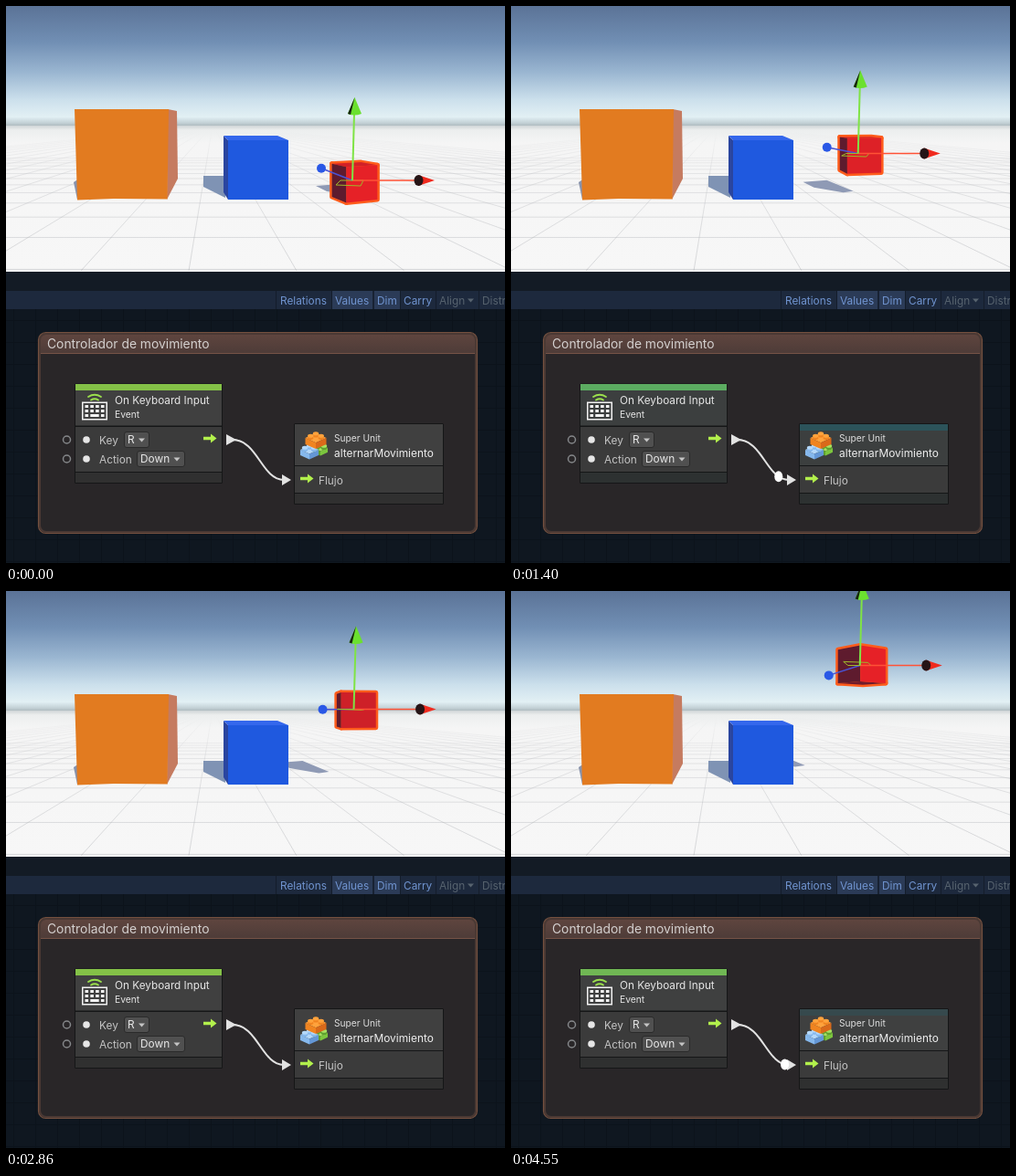
These frames come from a looping animation (546x610 px, 4.63 s). An HTML page:

```html
<!DOCTYPE html>
<html lang="es">
<head>
<meta charset="utf-8">
<style>
  html, body { margin: 0; width: 100%; height: 100%; overflow: hidden; background: #0f1720; }
  svg { display: block; width: 546px; height: 610px; font-family: Inter, Roboto, sans-serif; }
</style>
</head>
<body>
<svg viewBox="0 0 546 610" xmlns="http://www.w3.org/2000/svg">
  <defs>
    <linearGradient id="sky" x1="0" y1="0" x2="0" y2="1">
      <stop offset="0" stop-color="#5b7397"/>
      <stop offset=".3" stop-color="#718fb4"/>
      <stop offset=".55" stop-color="#9ab6d1"/>
      <stop offset=".78" stop-color="#cce0ec"/>
      <stop offset=".92" stop-color="#e2f0f4"/>
      <stop offset=".97" stop-color="#c3d1d6"/>
      <stop offset="1" stop-color="#a9b4b8"/>
    </linearGradient>
    <linearGradient id="floor" x1="0" y1="0" x2="0" y2="1">
      <stop offset="0" stop-color="#cfd5d7"/>
      <stop offset=".03" stop-color="#eceeee"/>
      <stop offset=".12" stop-color="#f5f5f5"/>
      <stop offset="1" stop-color="#f7f7f7"/>
    </linearGradient>
    <linearGradient id="gridFade" x1="0" y1="0" x2="0" y2="1">
      <stop offset=".04" stop-color="#000"/>
      <stop offset=".35" stop-color="#999"/>
      <stop offset="1" stop-color="#fff"/>
    </linearGradient>
    <mask id="fadeMask" maskUnits="userSpaceOnUse" x="0" y="131" width="546" height="160">
      <rect y="131" width="546" height="160" fill="url(#gridFade)"/>
    </mask>
    <linearGradient id="title" x1="0" y1="0" x2="0" y2="1">
      <stop offset="0" stop-color="#60463f"/>
      <stop offset="1" stop-color="#4d3b38"/>
    </linearGradient>
    <clipPath id="view"><rect width="546" height="291"/></clipPath>
    <path id="flow" d="M0-1.7H8V-5L14.500 0L8 5V1.700H0Z" fill="#b2f04c"/>
    <path id="caret" d="M0 0H7L3.500 4Z"/>
  </defs>

  <g clip-path="url(#view)">
    <rect width="546" height="132" fill="url(#sky)"/>
    <rect y="131" width="546" height="160" fill="url(#floor)"/>
    <g mask="url(#fadeMask)"><path id="grid" fill="none" stroke="#8a9094" stroke-opacity=".38" stroke-width=".8"/></g>

    <path d="M74 193L80 189V212H78Z" fill="#8793ae"/>
    <path d="M177 113L187 115L188 189L176 212Z" fill="#c57b60"/>
    <path d="M75 113H178L176.500 211.500L118 211L78 212.500Z" fill="#e27b20"/>

    <path id="shadow" fill="#8f9ab5"/>
    <path d="M216 186H240V210L216 198Z" fill="#7f93b4"/>
    <path d="M238 142L243 147V212L238 204Z" fill="#2a459f"/>
    <path d="M238 142H297L309 147H243Z" fill="#3467ec"/>
    <path d="M243 147H309V212H243Z" fill="#1f59df"/>

    <g id="cube" stroke-linejoin="round"></g>

    <g id="gizmo" fill="none">
      <path id="blueLine" stroke="#4a52d4" stroke-width="1.500"/>
      <circle id="blueEnd" r="5" fill="#2a58e6"/>
      <path id="plane" stroke="#9fb82a"/>
      <path d="M0 0H68" stroke="#ff5236" stroke-width="1.600"/>
      <path d="M72-6L90 0L72 6Z" fill="#f02a1e"/>
      <ellipse cx="72.500" rx="5" ry="6" fill="#251416"/>
      <path d="M0 0L2-73" stroke="#7fe345" stroke-width="2"/>
      <path d="M2.500-91L10-73Q2-70-5-73Z" fill="#6be02f"/>
      <path d="M2.500-91L-5-73L-2-72Z" fill="#16240e"/>
    </g>
  </g>

  <rect y="291" width="546" height="21" fill="#131b25"/>
  <rect y="312" width="546" height="20" fill="#1d293d"/>
  <path d="M357 312H401V332H357ZM403 312H431V332H403Z" fill="#2b3b57"/>
  <path d="M295.500 312V332M356.500 312V332M402 312V332M431.500 312V332M470.500 312V332M517.500 312V332" stroke="#141d2b"/>
  <g font-size="11.850" fill="#7094d0">
    <text x="300" y="327">Relations</text>
    <text x="360" y="327">Values</text>
    <text x="406" y="327">Dim</text>
    <text x="435" y="327">Carry</text>
    <g fill="#57636f">
      <text x="474" y="327">Align</text>
      <use href="#caret" x="505" y="320.500"/>
      <text x="521" y="327">Distribute</text>
    </g>
  </g>

  <rect y="332" width="546" height="278" fill="#0f1720"/>
  <path id="cells" stroke="#0c131b" fill="none"/>

  <rect x="36" y="358" width="479" height="219" rx="8" fill="#292628"/>
  <path d="M36 381V366Q36 358 44 358H507Q515 358 515 366V381Z" fill="url(#title)"/>
  <path d="M36 380.500H515" stroke="#765347"/>
  <rect x="37" y="359" width="477" height="217" rx="7" fill="none" stroke="#4a3934" stroke-width="2"/>
  <rect x="35.500" y="357.500" width="480" height="220" rx="8" fill="none" stroke="#74503f" stroke-width="1.200"/>
  <text x="45" y="375" font-size="13.850" fill="#d4d0cf">Controlador de movimiento</text>

  <g>
    <rect x="75" y="413.500" width="162" height="109.500" rx="1.500" fill="#151617"/>
    <rect id="eventBar" x="76" y="414" width="160" height="7"/>
    <rect class="head" x="76" y="421" width="160" height="38.500"/>
    <rect x="76" y="461" width="160" height="49" fill="#3b3b3b"/>
    <rect class="foot" x="76" y="511" width="160" height="11"/>
    <g fill="none" stroke="#9be04c" stroke-width="1.800" stroke-linecap="round">
      <path d="M90 428Q97 423.500 104 428M93 431.500Q97 429 101 431.500"/>
    </g>
    <g fill="none" stroke="#f2f2f2">
      <rect x="83.750" y="434.250" width="26.500" height="18.500" stroke-width="1.500"/>
      <path d="M86.500 438.500H107.500M86.500 443.500H107.500" stroke-width="3" stroke-dasharray="3.600 2.200"/>
      <path d="M86.500 448.500H90.100M92.300 448.500H101.700M103.900 448.500H107.500" stroke-width="3"/>
    </g>
    <g fill="#e6e6e6">
      <text x="119" y="436" font-size="11.750">On Keyboard Input</text>
      <text x="119" y="451" font-size="10.300">Event</text>
      <circle cx="88" cy="475" r="3.800"/>
      <circle cx="88" cy="496" r="3.800"/>
    </g>
    <g fill="none" stroke="#85878a" stroke-width="1.500">
      <circle cx="66.500" cy="475" r="4"/>
      <circle cx="66.500" cy="496" r="4"/>
    </g>
    <g fill="#505050" stroke="#2a2a2a">
      <rect x="129.500" y="466.500" width="27" height="17" rx="2.500"/>
      <rect x="143.500" y="487.500" width="52" height="17" rx="2.500"/>
    </g>
    <g font-size="11.850" fill="#c4c4c4">
      <text x="102" y="480">Key</text>
      <text x="102" y="501">Action</text>
      <g fill="#e8e8e8">
        <text x="133" y="479">R</text>
        <text x="147" y="500">Down</text>
      </g>
      <use href="#caret" x="145" y="473.500"/>
      <use href="#caret" x="183.500" y="494.500"/>
    </g>
    <use href="#flow" x="216" y="473.500"/>
  </g>

  <g>
    <rect x="315" y="457" width="164" height="89" rx="1.500" fill="#151617"/>
    <rect class="head" x="316" y="458" width="162" height="45"/>
    <rect id="unitBar" x="316" y="458" width="162" height="7"/>
    <rect x="316" y="504" width="162" height="29" fill="#3b3b3b"/>
    <rect class="foot" x="316" y="534" width="162" height="11"/>
    <g id="bricks"></g>
    <text x="359" y="477" font-size="10.200" fill="#dedede">Super Unit</text>
    <text x="359" y="494" font-size="11.900" fill="#eee">alternarMovimiento</text>
    <use href="#flow" x="322" y="517.500"/>
    <text x="342" y="524" font-size="11.850" fill="#c4c4c4">Flujo</text>
  </g>

  <path id="wire" d="M248 475C275 475 280 519 304 519" fill="none" stroke="#e2e2e2" stroke-width="2"/>
  <path d="M241 469L252 475L241 481ZM302 513L312 519L302 525Z" fill="#e2e2e2"/>
  <ellipse id="drop" rx="4.500" ry="6" fill="#fff"/>
</svg>

<script>
const $ = id => document.getElementById(id);
const set = (el, attrs) => { for (const k in attrs) el.setAttribute(k, attrs[k]); };
const clamp = v => Math.max(0, Math.min(1, v));
const mix = (a, b, p) => a + (b - a) * p;
const blend = (a, b, p) => `rgb(${a.map((v, i) => Math.round(mix(v, b[i], p)))})`;
const poly = pts => 'M' + pts.map(p => p.map(v => v.toFixed(2)).join(' ')).join('L') + 'Z';

const LOOP = 4630, FIRST = 318.5, STEP = 76.93;
const HORIZON = 131, DEPTH = 420, SIDE = 37, FADE = 520;

// time, gizmo centre y, cube turn in degrees
const MOTION = [
  [310, 191, 27], [550, 182, 100], [780, 171, 197], [1040, 161.5, 285], [1570, 161.5, 285],
  [1790, 151.5, 363], [2290, 129.5, 550], [3110, 129.5, 550], [3475, 109, 762],
  [3630, 102.5, 810], [4110, 81.5, 942]
];
const PRESSES = [310, 1040, 1570, 2290, 3110, 4110];
const WITHOUT_DROP = [1570, 3110];
const DROP = [[70, 0], [240, .54], [360, .85], [440, .94], [FADE, 1]];

function track(keys, t, col) {
  const i = keys.findIndex(k => k[0] > t);
  if (i === 0) return keys[0][col];
  if (i < 0) return keys[keys.length - 1][col];
  const a = keys[i - 1], b = keys[i];
  return mix(a[col], b[col], (t - a[0]) / (b[0] - a[0]));
}

function brick(x, y, w, top, left, right) {
  const h = w * .45, b = w * .6;
  const stud = (dx, dy) => [[0, left], [-2.2, top]].map(([lift, fill]) =>
    `<ellipse cx="${x + dx}" cy="${y + dy + lift}" rx="3.2" ry="2" fill="${fill}"/>`).join('');
  return `<path d="M${x - w} ${y}L${x} ${y - h}L${x + w} ${y}L${x} ${y + h}Z" fill="${top}"/>
    <path d="M${x - w} ${y}L${x} ${y + h}V${y + h + b}L${x - w} ${y + b}Z" fill="${left}"/>
    <path d="M${x + w} ${y}L${x} ${y + h}V${y + h + b}L${x + w} ${y + b}Z" fill="${right}"/>`
    + stud(0, -h / 2) + stud(-w / 2, 0) + stud(w / 2, 0);
}

function buildStatic() {
  let d = '';
  for (let k = -14; k <= 14; k++) d += `M226 ${HORIZON}L${318 + k * 118} 290`;
  for (let z = 3.5; z < 16; z++) d += `M0 ${HORIZON + 551 / z}H546`;
  $('grid').setAttribute('d', d);

  d = '';
  for (let x = 8; x < 546; x += 24) d += `M${x}.5 332V610`;
  for (let y = 344; y < 610; y += 24) d += `M0 ${y}.5H546`;
  $('cells').setAttribute('d', d);

  $('bricks').innerHTML =
    brick(344, 484, 8, '#a8e060', '#5ea030', '#7cc63e') +
    brick(332, 486, 10, '#b4d8fa', '#86b8ec', '#6497d6') +
    brick(339, 473, 11.5, '#ffa23c', '#f08420', '#d9691a');
}

// Angle of the face to the right of the viewer; the light comes from there.
const faceColor = angle => blend([94, 27, 46], [230, 33, 39], clamp((angle + 27) / 45));

function drawCube(cx, cy, turn) {
  const deg = turn % 90, half = SIDE / 2;
  const c = Math.cos(deg * Math.PI / 180), s = Math.sin(deg * Math.PI / 180);
  const at = (u, y, v) => {
    const k = DEPTH / (DEPTH + (u * s + v * c) * half);
    return [cx + (u * c - v * s) * half * k, HORIZON + (cy - HORIZON + y * half) * k];
  };
  const lid = y => [at(-1, y, -1), at(1, y, -1), at(1, y, 1), at(-1, y, 1)];
  const faces = [
    [[at(-1, -1, -1), at(-1, -1, 1), at(-1, 1, 1), at(-1, 1, -1)], faceColor(deg - 90)],
    [[at(-1, -1, -1), at(1, -1, -1), at(1, 1, -1), at(-1, 1, -1)], faceColor(deg)]
  ];
  if (cy - half > HORIZON) faces.unshift([lid(-1), '#d22127']);
  if (cy + half < HORIZON) faces.unshift([lid(1), '#701b2c']);
  const rim = faces.map(f => `<path d="${poly(f[0])}" fill="none" stroke="#ff5c1c" stroke-width="5"/>`);
  const fill = faces.map(f => `<path d="${poly(f[0])}" fill="${f[1]}"/>`);
  $('cube').innerHTML = rim.join('') + fill.join('');
}

function drawScene(t) {
  const y = track(MOTION, t, 1), turn = track(MOTION, t, 2);
  const rise = 191 - y, drift = rise * .025;
  drawCube(381 + drift, y + 1, turn);

  const sx = 367 - rise * .66, sy = 202 - rise * .145;
  $('shadow').setAttribute('d', poly([[sx - 28, sy - 5], [sx - 2, sy - 7], [sx + 27, sy + 5], [sx + 16, sy + 6.5], [sx - 16, sy + 1]]));

  $('gizmo').setAttribute('transform', `translate(${379 + drift} ${y})`);
  const back = (HORIZON - y) * .22, slant = (y - HORIZON) / 12;
  $('blueLine').setAttribute('d', `M0 0L-34 ${back}`);
  set($('blueEnd'), { cx: -34, cy: back });
  $('plane').setAttribute('d', poly([[-18, slant], [9, slant + 1], [12, 0], [-13, 0]]));
}

function drawNodes(t) {
  const press = PRESSES.filter(p => p <= t).pop();
  const age = press === undefined ? FADE : t - press;
  const glow = 1 - clamp(age / FADE), tint = glow ** 1.6;
  $('eventBar').setAttribute('fill', blend([132, 193, 71], [4, 126, 152], glow));
  $('unitBar').setAttribute('fill', blend([64, 64, 64], [2, 124, 146], glow));
  const head = blend([64, 64, 64], [38, 56, 58], tint);
  const foot = blend([48, 48, 48], [31, 54, 57], tint);
  document.querySelectorAll('.head').forEach(el => el.setAttribute('fill', head));
  document.querySelectorAll('.foot').forEach(el => el.setAttribute('fill', foot));

  const visible = age > 70 && age < FADE && !WITHOUT_DROP.includes(press);
  const wire = $('wire');
  const p = wire.getPointAtLength(wire.getTotalLength() * track(DROP, age, 1));
  set($('drop'), { cx: p.x, cy: p.y, visibility: visible ? 'visible' : 'hidden' });
}

function render(time) {
  const t = time % LOOP;
  const held = t < FIRST ? 0 : FIRST + Math.floor((t - FIRST) / STEP) * STEP;
  drawScene(held);
  drawNodes(held);
}

buildStatic();
const start = performance.now();
function tick() {
  render(performance.now() - start);
  requestAnimationFrame(tick);
}
tick();
</script>
</body>
</html>
```
